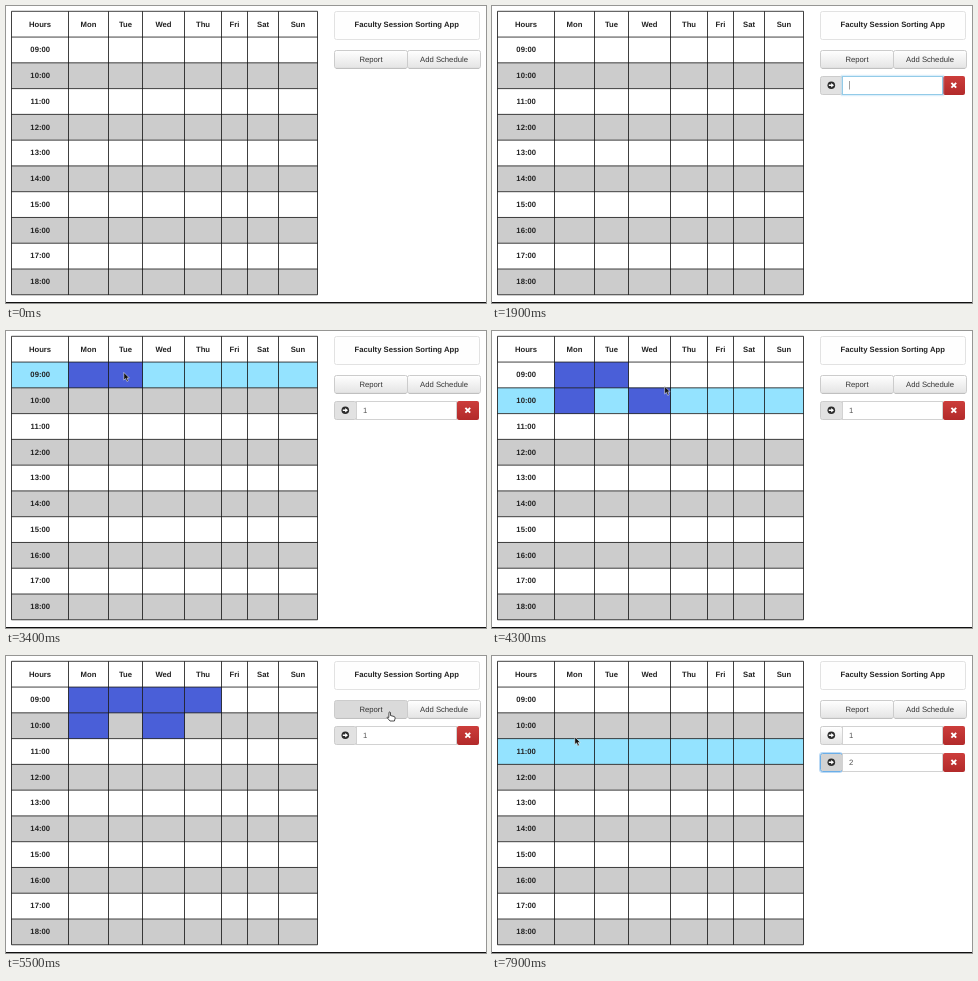
An HTML page that plays this animation: 480x297 px, repeating every 8 s.

```html
<!DOCTYPE html>
<html lang="en">
<head>
<meta charset="utf-8">
<title>Planner</title>
<style>
  html, body { margin: 0; width: 100%; height: 100%; overflow: hidden; background: #fff; }
  svg { display: block; width: 100vw; height: 100vh; }
  text { font: 7.7px "Liberation Sans", Arial, sans-serif; fill: #333; text-anchor: middle; text-rendering: geometricPrecision; }
  .bold { font-weight: bold; fill: #222; }
  .left { text-anchor: start; fill: #555; }
  .grid { stroke: #111; stroke-width: .8; }
</style>
</head>
<body>
<svg viewBox="0 0 480 297">
  <defs>
    <linearGradient id="plain" x2="0" y2="1"><stop stop-color="#fff"/><stop offset="1" stop-color="#e4e4e4"/></linearGradient>
    <linearGradient id="danger" x2="0" y2="1"><stop stop-color="#cc3d3b"/><stop offset="1" stop-color="#b22a2a"/></linearGradient>
  </defs>
  <g id="scene"></g>
</svg>
<script>
const LOOP = 8000, STEP = 100, TRAVEL = 300;
const LEFT = 5.5, TOP = 5.3, ROW = 25.77, ROWS = 10;
const widths = { Hours: 57, Mon: 40, Tue: 34, Wed: 42, Thu: 37, Fri: 26, Sat: 31, Sun: 39 };
const edges = Object.values(widths).reduce((xs, w) => [...xs, xs.at(-1) + w], [LEFT]);
const RIGHT = edges.at(-1);

const rowY = r => TOP + ROW * r;
const entryY = n => 70 + 27 * n;
const cell = (c, r, u = .5, v = .5) =>
  ({ c, r, x: edges[c] + (edges[c + 1] - edges[c]) * u, y: rowY(r + v) });
const input = n => ({ x: 400, y: entryY(n) + 9 });
const arrow = n => ({ x: 340, y: entryY(n) + 9 });
const addButton = { x: 441, y: 57.5 }, reportButton = { x: 384, y: 58.5 };

// Arrival time, place, action on arrival
const script = [
  [0, { x: 203, y: 300 }],
  [100, cell(4, 10)],
  [500, cell(4, 0)],
  [900, addButton],
  [1300, addButton, 'add'],
  [1800, input(0), 'focus'],
  [2200, input(0), 'type'],
  [2600, cell(1, 1, .05, .85)],
  [3000, cell(1, 1), 'mark'],
  [3400, cell(2, 1), 'mark'],
  [3900, cell(1, 2), 'mark'],
  [4300, cell(3, 2, .9, .04), 'mark'],
  [4500, cell(3, 1), 'mark'],
  [4800, cell(4, 1), 'mark'],
  [5500, reportButton],
  [5900, addButton],
  [6200, addButton, 'add'],
  [6800, input(1), 'focus'],
  [7300, input(1), 'type'],
  [7500, arrow(1), 'pick'],
  [7900, cell(1, 3, .55, .03)]
];

function stateAt(t) {
  const s = { entries: 0, typed: 0, focus: -1, picked: 0, marks: [], hidden: false, blink: 0 };
  for (const [at, place, action] of script) {
    if (at > t) break;
    if (action === 'add') s.entries++;
    if (action === 'focus') Object.assign(s, { focus: s.entries - 1, hidden: true, blink: at });
    if (action === 'type') Object.assign(s, { typed: s.entries, hidden: false, blink: at });
    if (action === 'mark') { s.marks.push(place); s.focus = -1; }
    if (action === 'pick') Object.assign(s, { marks: [], focus: -1, picked: 1 });
  }
  return s;
}

function pointerAt(t) {
  const i = Math.max(1, script.findIndex(([at]) => at >= t));
  const [t0, a] = script[i - 1], [t1, b] = script[i];
  const span = Math.min(TRAVEL, t1 - t0);
  const u = Math.max(0, 1 - (t1 - t) / span), e = u * u * (3 - 2 * u);
  return { x: a.x + (b.x - a.x) * e, y: a.y + (b.y - a.y) * e };
}

const rect = (x, y, w, h, fill, extra = '') =>
  `<rect x="${x}" y="${y}" width="${w}" height="${h}" fill="${fill}" ${extra}/>`;
const label = (s, x, y, cls = '') => `<text x="${x}" y="${y}" class="${cls}">${s}</text>`;
const inside = (p, x, y, w, h) => p.x >= x && p.x < x + w && p.y >= y && p.y < y + h;

function table(s, p) {
  let out = '', lines = '';
  for (let r = 1; r <= ROWS; r++) {
    const hover = inside(p, LEFT, rowY(r), RIGHT - LEFT, ROW);
    out += rect(LEFT, rowY(r), RIGHT - LEFT, ROW, hover ? '#94e3ff' : r % 2 ? '#fff' : '#ccc');
    out += label(String(r + 8).padStart(2, '0') + ':00', 34.2, rowY(r) + 15.2, 'bold');
  }
  for (const { c, r } of s.marks) out += rect(edges[c], rowY(r), edges[c + 1] - edges[c], ROW, '#4a5fd8');
  for (let r = 0; r <= ROWS + 1; r++) lines += `M${LEFT} ${rowY(r)}H${RIGHT}`;
  for (const x of edges) lines += `M${x} ${TOP}V${rowY(ROWS + 1)}`;
  Object.keys(widths).forEach((day, c) => out += label(day, cell(c, 0).x, 20.5, 'bold'));
  return out + `<path class="grid" d="${lines}"/>`;
}

function button(name, x, p) {
  const hover = inside(p, x, 44, 73, 19);
  return rect(x + .5, 44.5, 73, 17.8, hover ? '#dadada' : 'url(#plain)', 'stroke="#ccc" rx="2"') +
    rect(x + 2, 62, 70, .7, '#b8b8b8') + label(name, x + 37, 56);
}

function entry(n, s, t) {
  const y = entryY(n), mid = y + 9.2;
  const focus = s.focus === n, hasText = n < s.typed;
  const pressed = n > 0 && s.picked === n;
  const fill = pressed ? '#d2d2d2' : s.picked ? 'url(#plain)' : '#e2e2e2';
  let out = rect(328.5, y + .5, 22, 18, fill, `rx="2" stroke="${pressed ? '#6aaee8' : '#ccc'}"`);
  if (pressed) out += rect(327.5, y - .5, 23, 20, 'none', 'rx="2.5" stroke="#8fc1ee" stroke-opacity=".6"');
  out += `<circle cx="339.3" cy="${mid}" r="3.8" fill="#2b2b2b"/>
    <path d="M336.8 ${mid - .7}h2.4v-1.6l2.8 2.3-2.8 2.3v-1.6h-2.4z" fill="#fff"/>`;
  out += rect(451, y, 22, 19, 'url(#danger)', 'rx="2"') +
    `<path d="M459.4 ${mid - 2.4}l4.8 4.8m0-4.8l-4.8 4.8" stroke="#fff" stroke-width="1.9"/>`;
  if (focus) out += rect(350, y, 101, 19, 'none', 'stroke="#a9d6f5" stroke-opacity=".4" stroke-width="2.5"');
  out += rect(350.5, y + .5, 100, 18, '#fff', `stroke="${focus ? '#93cbe8' : '#d2d2d2'}"`);
  if (hasText) out += label(n + 1, 357, y + 12, 'left');
  if (focus && (t - s.blink) % 1000 < 500) out += rect(hasText ? 361 : 357.3, y + 5, .7, 8.5, '#777');
  return out;
}

function cursor(s, p) {
  const overEntry = (x, w) => [...Array(s.entries).keys()].some(n => inside(p, x, entryY(n), w, 19));
  const place = `transform="translate(${p.x} ${p.y})"`;
  if (inside(p, 328, 44, 147, 19) || overEntry(328, 22))
    return `<path ${place} d="M-1-2.2Q0-3 .5-2v3l3.6 1q1.2.4 1 1.8L4.4 6.5H0L-2.8 3.2Q-3 2-1.2 3z" fill="#fff" stroke="#222" stroke-width=".8"/>`;
  if (overEntry(350, 101))
    return `<path ${place} d="M-1.5-4h3M0-4v8M-1.5 4h3" fill="none" stroke="#444" stroke-width=".8"/>`;
  return `<path ${place} d="M-1.7-2.5v7.6l1.8-1.6 1.3 3 1.4-.6-1.3-2.9h2.3z" fill="#111" stroke="#fff" stroke-width=".5"/>`;
}

function draw(t) {
  const s = stateAt(t), p = pointerAt(t);
  let out = rect(0, 296, 480, 1, '#111') + table(s, p) +
    rect(328.5, 5.5, 145, 28, '#fefefe', 'stroke="#e2e2e2" rx="2"') +
    label('Faculty Session Sorting App', 400.7, 21.4, 'bold') +
    button('Report', 328, p) + button('Add Schedule', 401, p);
  for (let n = 0; n < s.entries; n++) out += entry(n, s, t);
  return s.hidden ? out : out + cursor(s, p);
}

const scene = document.getElementById('scene');
let shown = -1;
function tick() {
  const t = Math.floor(performance.now() % LOOP / STEP) * STEP;
  if (t !== shown) scene.innerHTML = draw(shown = t);
  requestAnimationFrame(tick);
}
tick();
</script>
</body>
</html>
```
